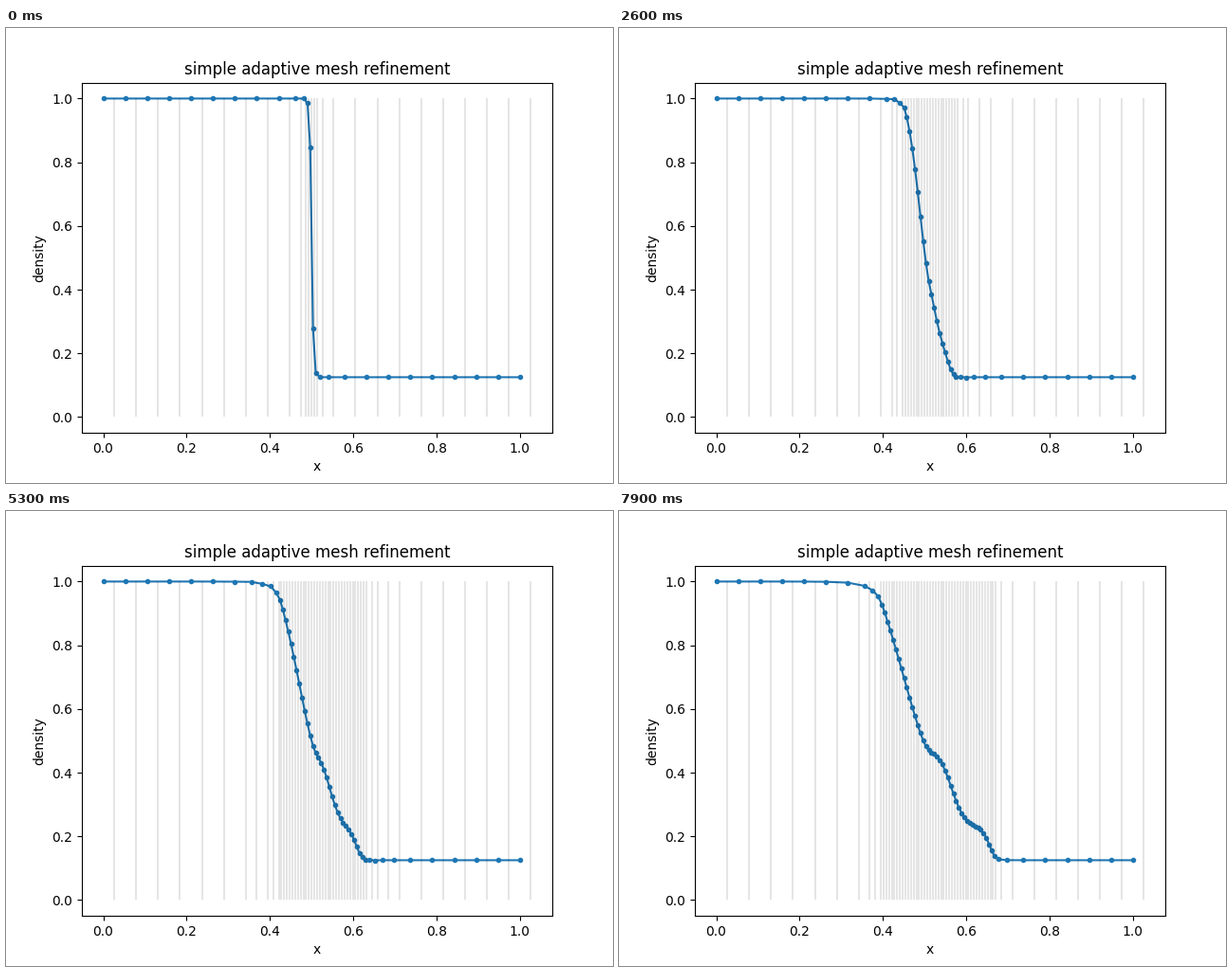
A matplotlib script that plays this animation: 640 px wide and 480 px high, repeating every 8 s.

```python
import numpy as np
import matplotlib.pyplot as plt
from matplotlib.animation import FuncAnimation

FRAMES = 80
DT = 0.001
GAMMA = 5 / 3
UNIT = 1 / 152          # finest cell width
BASE = 8                # base cell width, in finest cells
START = -1 / 38         # left face of the first cell


def mesh(n):
    """Cell faces of a graded mesh around the growing fine zone."""
    a = 2 * (37 - int(np.floor((n - 13) / 12.4)))
    b = 2 * min(41 + n, 53 + int(np.floor((n - 73) / 6.78)))
    parts = [np.arange(a, b + 1)]
    for width in (4, 8):
        a = width * -((width - a) // width)
        b = width * (b // width) + width
        parts.append(np.arange(a, b + 1, width // 2))
    parts.append(np.arange(0, 20 * BASE + 1, BASE))
    return START + UNIT * np.unique(np.concatenate(parts))


def centers(faces):
    return (faces[1:] + faces[:-1]) / 2


def remesh(u, old, new):
    """Linear prolongation onto the refined mesh."""
    xo, xn = centers(old), centers(new)
    parent = np.searchsorted(old, xn) - 1
    slope = np.gradient(u, xo, axis=1)
    return u[:, parent] + slope[:, parent] * (xn - xo[parent])


def step(u, faces):
    """One first-order finite-volume step with HLL fluxes."""
    u = np.pad(u, ((0, 0), (1, 1)), mode="edge")
    rho, mom, ene = u
    v = mom / rho
    p = (GAMMA - 1) * (ene - mom * v / 2)
    c = np.sqrt(GAMMA * p / rho)
    f = np.array([mom, mom * v + p, (ene + p) * v])
    lo, hi = v - c, v + c
    sl = np.minimum(np.minimum(lo[:-1], lo[1:]), 0)
    sr = np.maximum(np.maximum(hi[:-1], hi[1:]), 0)
    flux = (sr * f[:, :-1] - sl * f[:, 1:]
            + sl * sr * (u[:, 1:] - u[:, :-1])) / (sr - sl)
    return u[:, 1:-1] - DT * np.diff(flux, axis=1) / np.diff(faces)


def solve():
    faces = mesh(0)
    left = centers(faces) < 0.5
    u = np.array([np.where(left, 1, 0.125),
                  np.zeros(left.size),
                  np.where(left, 1, 0.1) / (GAMMA - 1)])
    u = step(u, faces)
    states = []
    for n in range(FRAMES):
        new = mesh(n)
        if new.size != faces.size:
            u = remesh(u, faces, new)
            faces = new
        u = step(u, faces)
        states.append((faces, u[0]))
    return states


states = solve()

fig, ax = plt.subplots(figsize=(6.4, 4.8), dpi=100)
curve, = ax.plot([], [], ".-")
walls = ax.vlines([0], 0, 1, colors="k", alpha=0.1, linewidth=1.5)
right = 1 - START
ax.set(title="simple adaptive mesh refinement", xlabel="x", ylabel="density",
       xlim=(-0.05 * right, 1.05 * right), ylim=(-0.05, 1.05))


def update(n):
    faces, rho = states[n]
    curve.set_data(centers(faces), rho)
    walls.set_segments([[(x, 0), (x, 1)] for x in faces[1:]])
    return curve, walls


anim = FuncAnimation(fig, update, frames=FRAMES, interval=100, repeat=True)
plt.show()
```
